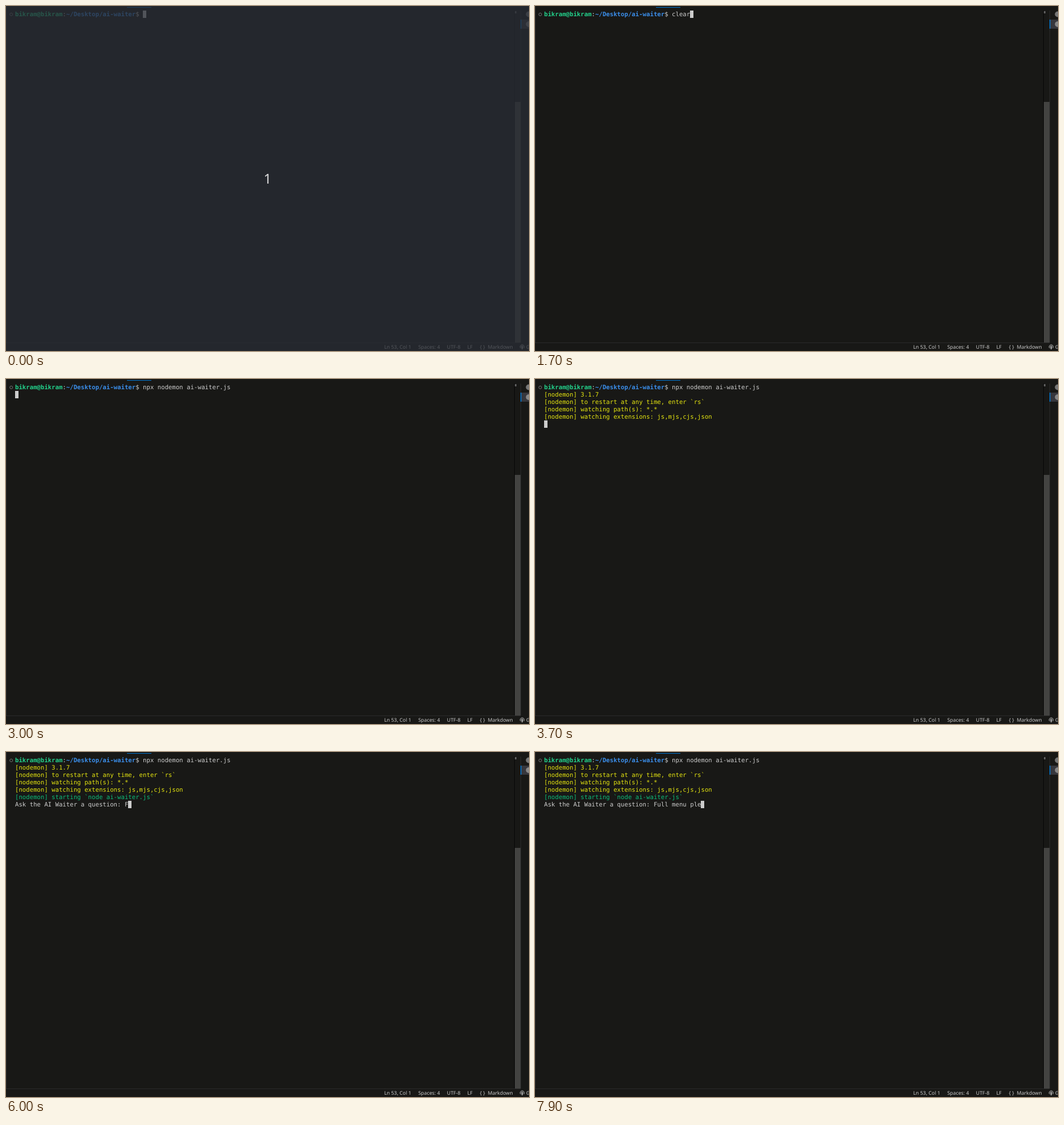
Recreate the animation shown at these times as an HTML page with a canvas. Size 921 by 608 pixels, loop 8 s.

```html
<!DOCTYPE html>
<html lang="en">
<head>
<meta charset="utf-8">
<title>Terminal session</title>
<style>
  html, body { margin: 0; width: 100%; height: 100%; overflow: hidden; background: #181816; }
  canvas { display: block; }
</style>
</head>
<body>
<canvas id="stage" width="921" height="608"></canvas>
<script>
const ctx = document.getElementById('stage').getContext('2d');
const LOOP = 8000, LEFT = 16, CELL = 6.43, ROW = 12.93;
const MONO = '10.68px "DejaVu Sans Mono", monospace';
const SANS = '"Noto Sans", sans-serif';
const GREY = '#cccccc', YELLOW = '#e5e510', GREEN = '#0dbc79';

const prompt = [['bikram@bikram', '#23d18b', 1], [':', GREY], ['~/Desktop/ai-waiter', '#3b8eea', 1], ['$ ', GREY]];
const output = [
  [3400, '[nodemon] 3.1.7', YELLOW],
  [3500, '[nodemon] to restart at any time, enter `rs`', YELLOW],
  [3600, '[nodemon] watching path(s): *.*', YELLOW],
  [3700, '[nodemon] watching extensions: js,mjs,cjs,json', YELLOW],
  [3800, '[nodemon] starting `node ai-waiter.js`', GREEN]
];
const question = 'Ask the AI Waiter a question: ';
const answer = 'Full menu ple';
const keyTimes = [6000, 6100, 6400, 6500, 6600, 6900, 7000, 7100, 7200, 7400, 7600, 7800, 7900];

function rect(x, y, w, h, color) {
  ctx.fillStyle = color;
  ctx.fillRect(x, y, w, h);
}

function circle(x, y, r, color, filled, from = 0, to = 2 * Math.PI) {
  ctx.beginPath();
  ctx.arc(x, y, r, from, to);
  ctx.fillStyle = ctx.strokeStyle = color;
  filled ? ctx.fill() : ctx.stroke();
}

// Writes text on the character grid and returns the next free column.
function write(text, col, row, color, bold) {
  ctx.font = (bold ? 'bold ' : '') + MONO;
  ctx.fillStyle = color;
  for (const ch of text) ctx.fillText(ch, LEFT + CELL * col++, 18.3 + ROW * row);
  return col;
}

function drawWindow() {
  rect(0, 0, 921, 608, '#181816');
  rect(0, 0, 1, 593, '#2b2b2b');
  rect(0, 593, 906, 1, '#2b2b2b');
  rect(213, 2, 43, 1, '#0078d4');

  // scrollbar
  rect(895, 8, 1, 585, '#060606');
  rect(906, 8, 1, 585, '#2b2b2b');
  rect(896, 169, 10, 424, '#434341');
  rect(896, 9, 3, 4, '#5c5c5c');

  // terminal list
  rect(907, 24, 14, 16, '#37373d');
  rect(906, 24, 1.5, 16, '#0078d4');
  circle(920.5, 14.5, 5, '#777777', true);
  circle(920.5, 32, 5, '#888888', true);

  // status bar
  ctx.font = '8.8px ' + SANS;
  ctx.fillStyle = GREY;
  const items = [['Ln 53, Col 1', 666], ['Spaces: 4', 726], ['UTF-8', 776.5], ['LF', 812.5],
                 ['{ }', 834.5], ['Markdown', 848.5], ['Go Live', 916]];
  for (const [text, x] of items) ctx.fillText(text, x, 604);
  ctx.lineWidth = 0.8;
  circle(909, 600.7, 3.7, GREY, false, 2.3, 7.1);
  circle(909, 600.7, 1.9, GREY, false, 2.5, 6.9);
  rect(908.2, 600, 1.6, 5, GREY);

  ctx.lineWidth = 1;
  circle(9.2, 14.8, 2.5, '#747474', false);
}

function drawTerminal(t) {
  let col = 0, row = 0;
  for (const [text, color, bold] of prompt) col = write(text, col, 0, color, bold);
  const command = t < 1700 ? '' : t < 2000 ? 'clear' : 'npx nodemon ai-waiter.js ';
  col = write(command, col, 0, GREY);

  if (t >= 3000) {
    col = 0;
    row = 1;
    for (const [start, text, color] of output) {
      if (t >= start) write(text, 0, row++, color);
    }
  }
  if (t >= 4000) {
    const typed = keyTimes.filter(k => t >= k).length;
    col = write(question + answer.slice(0, typed), 0, row, GREY);
  }
  rect(Math.round(LEFT + CELL * col), Math.round(8.3 + ROW * row), 6, 13, GREY);
}

function drawCountdown() {
  rect(0, 0, 921, 608, 'rgba(40, 44, 52, 0.75)');
  ctx.font = '24px ' + SANS;
  ctx.fillStyle = '#dcdcdc';
  ctx.textAlign = 'center';
  ctx.fillText('1', 460.5, 313);
  ctx.textAlign = 'left';
}

function draw() {
  const t = performance.now() % LOOP;
  ctx.textRendering = 'geometricPrecision';
  drawWindow();
  drawTerminal(t);
  if (t < 100) drawCountdown();
  requestAnimationFrame(draw);
}
draw();
</script>
</body>
</html>
```
